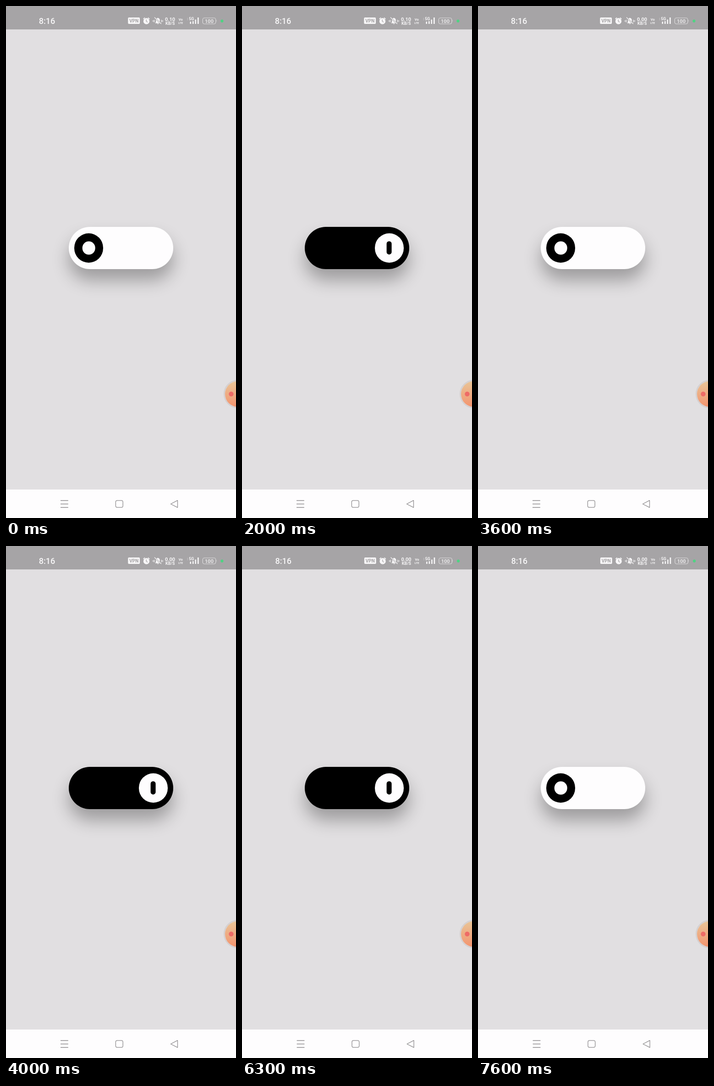
Write an HTML page that moves like this. It is 502x1115 px and loops after 8100 ms.

```html
<!DOCTYPE html>
<html lang="en">
<head>
<meta charset="utf-8">
<title>Toggle switch</title>
<style>
  html, body { margin: 0; width: 100%; height: 100%; overflow: hidden; background: #e1dfe1; }
  svg { position: absolute; left: 0; top: 0; }
  text { font-family: Roboto, sans-serif; font-weight: 700; text-anchor: middle; }
  #track {
    position: absolute; left: 137px; top: 480.7px; width: 228px; height: 92px;
    border-radius: 46px; box-shadow: 0 24px 37px rgba(0, 0, 0, .3);
  }
  #knob { position: absolute; top: 14.5px; width: 63.4px; height: 63.4px; border-radius: 50%; }
  #hole { position: absolute; border-radius: 15px; transform: translate(-50%, -50%); left: 50%; top: 50%; }
</style>
</head>
<body>
<svg width="502" height="1115" viewBox="0 0 502 1115">
  <defs>
    <linearGradient id="peach" x1="0" y1="0" x2="0" y2="1">
      <stop offset="0" stop-color="#e9c598"/>
      <stop offset="1" stop-color="#f3946f"/>
    </linearGradient>
  </defs>
  <rect width="502" height="51" fill="#a6a4a6"/>
  <rect y="1053" width="502" height="62" fill="#fefdfe"/>

  <circle cx="506" cy="845" r="29.5" fill="none" stroke="#d2cecd" stroke-width="3" opacity=".8"/>
  <circle cx="506" cy="845" r="28" fill="url(#peach)"/>
  <circle cx="491.5" cy="845" r="5.2" fill="#ee6b67"/>

  <g class="chrome" fill="#f7f6f7">
    <text x="89.6" y="38.6" font-size="18" style="font-weight:500">8:16</text>

    <rect x="266.3" y="25" width="25.8" height="14" rx="2"/>
    <text x="279.2" y="35.7" font-size="10" fill="#a6a4a6">VPN</text>

    <circle cx="306.5" cy="33" r="6.7"/>
    <path d="M299.7 28.4l3.4-3M313.3 28.4l-3.4-3" stroke="#f7f6f7" stroke-width="1.7"/>
    <path d="M306.3 29.5v4l2.8 1.8" fill="none" stroke="#a6a4a6" stroke-width="1.3"/>

    <path d="M325.5 37.5l1.7-2.6v-4.2q.4-4 4.3-4.9q3.900.9 4.300 4.900v4.200l1.700 2.600zM329.500 38.300h4q-2 2.400-4 0z"/>
    <path d="M324.500 25.500l14.500 13.500" stroke="#a6a4a6" stroke-width="3"/>
    <path d="M324 24.800l15 14.200M323.500 30v5.500M321 31.300v3M339.500 30v5.500M342 31.300v3" stroke="#f7f6f7" stroke-width="1.300"/>

    <text id="speed" x="358" y="32.500" font-size="11">0.10</text>
    <text x="358.300" y="41" font-size="9">KB/S</text>
    <text x="381.300" y="31.500" font-size="7.500">Vo</text>
    <text x="381.200" y="38.700" font-size="6.200">LTE</text>

    <path d="M396.300 26v2M396.300 29v2" stroke="#c9c7c9" stroke-width="1.200"/>
    <text x="404.700" y="31" font-size="8.800">5G</text>
    <path d="M401.500 34h2.600v5h-2.600zM407 33h2.600v6h-2.600zM412.500 29.500h2.600v9.500h-2.600zM418 25h2.700v14h-2.700z"/>

    <rect x="429.300" y="26" width="28.500" height="13" rx="3.700" fill="none" stroke="#dddcdd" stroke-width="1.200"/>
    <path d="M459 30.300q1.300 2.200 0 4.400z"/>
    <text x="443.500" y="36.500" font-size="11" fill="#e9e8e9">100</text>
    <circle cx="471.500" cy="32.700" r="3.100" fill="#4fd283"/>
  </g>

  <g class="chrome" fill="none" stroke="#8e8c8e" stroke-width="1.300">
    <path d="M119 1077h16.800M119 1084.500h16.800M119 1092h16.800"/>
    <rect x="239.400" y="1076.900" width="15.800" height="15" rx="3.400"/>
    <path d="M359.500 1084.500L374.500 1076.700V1092.200Z" stroke-linejoin="round"/>
  </g>
</svg>
<div id="track"><div id="knob"><div id="hole"></div></div></div>

<script>
  const LOOP = 8100, SLIDE = 300;
  const toggles = [850, 2250, 3650, 4750, 5950, 7250];
  const [track, knob, hole, speed] = ["track", "knob", "hole", "speed"].map(id => document.getElementById(id));
  const chrome = document.querySelectorAll(".chrome");
  const mix = (a, b, p) => a + (b - a) * p;

  function draw(time) {
    const past = toggles.filter(start => start <= time);
    const on = past.length % 2 === 1;
    const progress = past.length ? Math.min(1, (time - past.at(-1)) / SLIDE) : 1;
    const p = on ? progress : 1 - progress;
    const [back, front] = on ? ["#000", "#fefdfe"] : ["#fefdfe", "#000"];

    track.style.background = hole.style.background = back;
    knob.style.background = front;
    knob.style.left = mix(12, 152.6, p) + "px";
    hole.style.width = mix(28.6, 10.8, p) + "px";
    hole.style.height = mix(28.8, 29.6, p) + "px";

    speed.textContent = time < 3100 ? "0.10" : "0.00";
    const shift = time < 6000 ? 0 : 0.6;
    chrome.forEach(group => group.setAttribute("transform", `translate(${shift} 0)`));
  }

  function tick() {
    draw(performance.now() % LOOP);
    requestAnimationFrame(tick);
  }
  tick();
</script>
</body>
</html>
```
